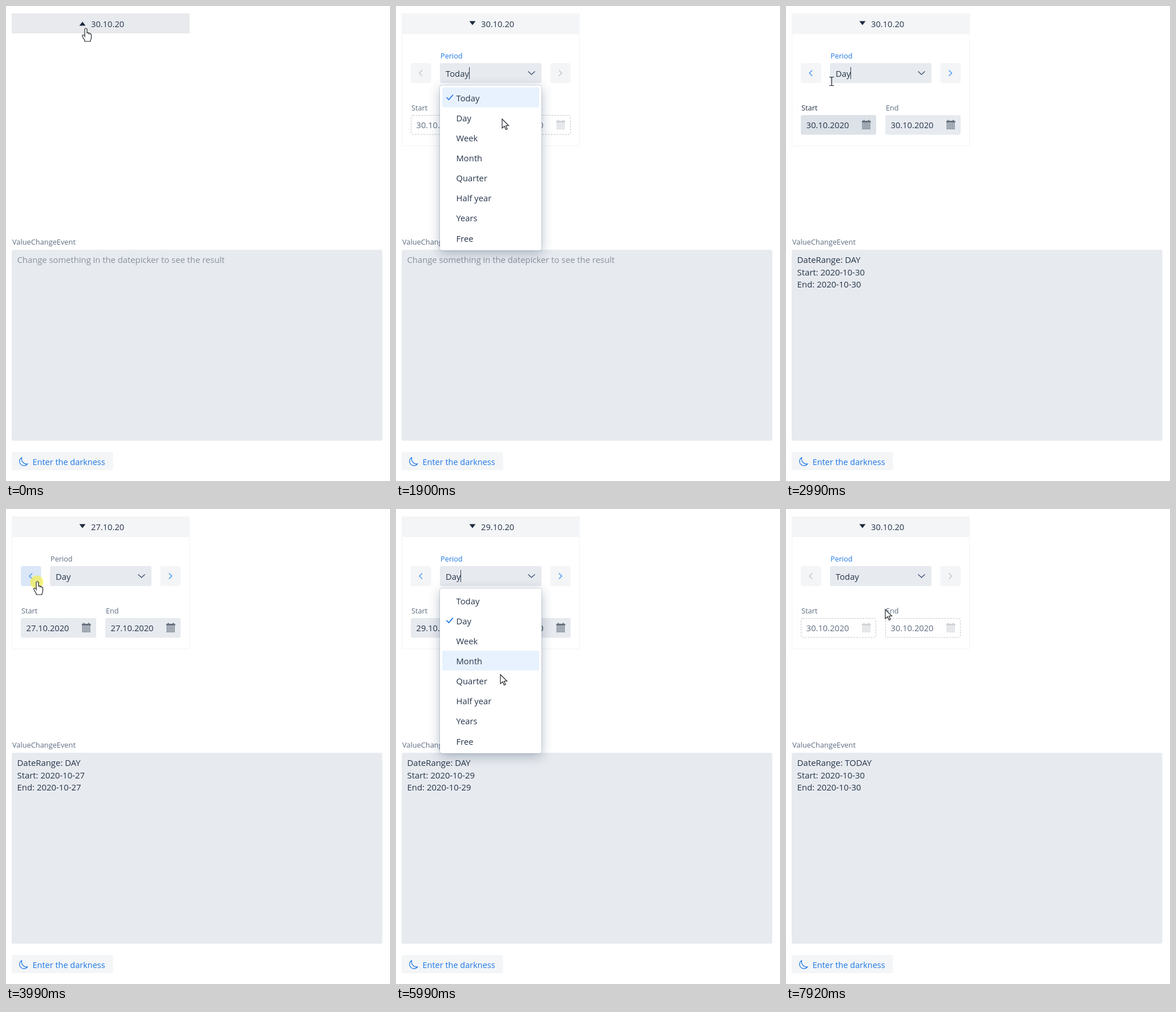
Animation, 673 px wide and 832 px high, one loop 8 s. Source, as an HTML page with a canvas:

```html
<!DOCTYPE html>
<html lang="en">
<head>
<meta charset="utf-8">
<title>Date range picker</title>
<style>
html, body { margin: 0; width: 100%; height: 100%; overflow: hidden; background: #fff; }
canvas { display: block; }
</style>
</head>
<body>
<canvas id="stage" width="673" height="832"></canvas>
<script>
const ctx = document.getElementById('stage').getContext('2d');
const LOOP = 8000;
const INK = '#26354a', MUTED = '#5e6d80', BLUE = '#1f78e6', FIELD = '#e7eaef', PALE = '#f4f5f7';
const ITEMS = ['Today', 'Day', 'Week', 'Month', 'Quarter', 'Half year', 'Years', 'Free'];
const CLICKS = [490, 1600, 2730, 3600, 3750, 3900, 4640, 4890, 5620, 7530];

// pointer path: time, x, y
const PATH = [
  [80, 140, 39], [400, 138, 31], [910, 138, 31], [1450, 190, 118], [1750, 188, 118],
  [1900, 186, 198], [2100, 160, 203], [2430, 150, 200], [2790, 150, 200], [2920, 110, 194],
  [2990, 80, 132], [3200, 55, 127], [4050, 55, 127], [4550, 290, 122], [5240, 290, 122],
  [5460, 187, 117], [5750, 186, 117], [5990, 183, 290], [6130, 183, 290], [6450, 180, 199],
  [7150, 180, 199], [7380, 178, 166], [7600, 178, 166], [7920, 174, 176]
];
const POINTERS = {
  hand: new Path2D('M-2 13V2A2 2 0 0 1 2 2V9Q2 7.5 3.3 7.5T4.6 9Q5 8 6.2 8.4T7.3 10Q9.5 9.5 9.5 12V16Q9.5 19 8 21V23H-2V21L-6 14.5Q-7 11.5 -5 11.5T-2 14Z'),
  arrow: new Path2D('M0 0V16L4 12.5L6.5 18.5L9 17.5L6.5 11.5H11.5Z'),
  beam: new Path2D('M-4 -7.5H-1L0 -6.5L1 -7.5H4M0 -6.5V6.5M-4 7.5H-1L0 6.5L1 7.5H4')
};
const HEADER = [10, 13, 312, 35], SELECT = [77, 100, 178, 35];
const PREV = [26, 100, 35.5, 35], NEXT = [270.5, 100, 35.5, 35];
const START = [26, 191, 132, 34.5], END = [174, 191, 132, 34.5];

const between = (t, a, b) => t >= a && t < b;
const inside = ([px, py], [x, y, w, h]) => px >= x && px < x + w && py >= y && py < y + h;

function pointerAt(t) {
  const i = PATH.findIndex(p => p[0] > t);
  if (i === 0) return PATH[0].slice(1);
  if (i < 0) return PATH[PATH.length - 1].slice(1);
  const [t0, x0, y0] = PATH[i - 1], [t1, x1, y1] = PATH[i];
  const u = (t - t0) / (t1 - t0), s = u * u * (3 - 2 * u);
  return [x0 + (x1 - x0) * s, y0 + (y1 - y0) * s];
}

const panelOpen = t => t >= 560;
const listOpen = t => between(t, 1750, 2800) || between(t, 5750, 7620);

// hover fades in and out over 200 ms
function hover(t, box) {
  let sum = 0;
  for (let k = 0; k < 5; k++) {
    const s = t - 40 * k;
    if (!listOpen(s) && inside(pointerAt(s), box)) sum++;
  }
  return sum / 5;
}

function text(str, x, y, color, size = 14.8) {
  ctx.font = size + 'px "Open Sans", "Noto Sans", sans-serif';
  ctx.fillStyle = color;
  ctx.fillText(str, x, y);
}

function box([x, y, w, h], color, r = 3) {
  ctx.fillStyle = color;
  ctx.beginPath();
  ctx.roundRect(x, y, w, h, r);
  ctx.fill();
}

function line(points, color, width) {
  ctx.strokeStyle = color;
  ctx.lineWidth = width;
  ctx.beginPath();
  points.forEach(([x, y]) => ctx.lineTo(x, y));
  ctx.stroke();
}

const shade = a => `rgba(20,45,80,${a})`;

function drawHeader(t, date) {
  box(HEADER, PALE, 0);
  box(HEADER, shade(0.055 * hover(t, HEADER)), 0);
  const [base, tip] = panelOpen(t) ? [26.5, 33.5] : [34.5, 27.5];
  ctx.fillStyle = '#1c2a3e';
  ctx.beginPath();
  ctx.moveTo(128.5, base);
  ctx.lineTo(139.5, base);
  ctx.lineTo(134, tip);
  ctx.fill();
  text(date, 149, 37, INK, 14.7);
}

function drawStep(t, area, dir, enabled) {
  box(area, PALE);
  if (enabled) box(area, `rgba(22,118,243,${0.11 * hover(t, area)})`);
  const x = area[0] + 17.5 + dir * 2.5;
  line([[x - dir * 5, 112.5], [x, 117.5], [x - dir * 5, 122.5]], enabled ? '#4f9ff5' : '#c3c8cf', 1.6);
}

function drawCalendar(x, color) {
  ctx.fillStyle = color;
  ctx.fillRect(x, 201, 15.5, 3.5);
  ctx.fillRect(x + 2.5, 199.5, 2, 2);
  ctx.fillRect(x + 11, 199.5, 2, 2);
  for (let r = 0; r < 4; r++)
    for (let c = 0; c < 5; c++) ctx.fillRect(x + 0.5 + c * 3, 205.5 + r * 2.8, 2.2, 2);
}

function drawDate(t, area, label, date, enabled) {
  const over = enabled ? hover(t, area) : 0;
  const x = area[0];
  text(label, x + 1, 182.5, over > 0.5 ? INK : MUTED, 12.7);
  if (enabled) {
    box(area, FIELD);
    box(area, shade(0.07 * over));
  } else {
    ctx.setLineDash([3, 2]);
    ctx.strokeStyle = '#c0c5cc';
    ctx.lineWidth = 1;
    ctx.beginPath();
    ctx.roundRect(x + 0.5, 191.5, 131, 33.5, 3);
    ctx.stroke();
    ctx.setLineDash([]);
  }
  text(date, x + 9.5, 214, enabled ? INK : MUTED, 14.7);
  drawCalendar(x + 107, enabled ? '#66717f' : '#cfd2d6');
}

function drawSelect(t, value) {
  const focus = between(t, 1600, 3530) || t >= 5620;
  const over = focus ? 0 : hover(t, SELECT);
  text('Period', 78, 91.5, focus ? BLUE : over > 0.5 ? INK : MUTED, 12.7);
  box(SELECT, FIELD);
  box(SELECT, shade(0.06 * over));
  text(value, 87, 124, INK);
  const since = t - (t < 4000 ? 1600 : 5620);
  if (focus && t < 7530 && since % 1000 < 500) {
    const x = Math.round(87 + ctx.measureText(value).width);
    ctx.fillRect(x, 107, 1, 21);
  }
  line([[231.5, 114.5], [237.5, 120], [243.5, 114.5]], '#4a5c78', 1.6);
}

function drawList(t, value) {
  ctx.save();
  ctx.shadowColor = shade(0.3);
  ctx.shadowBlur = 20;
  ctx.shadowOffsetY = 5;
  box([77, 139, 178, 289], '#fff', 4);
  ctx.restore();
  ctx.strokeStyle = shade(0.16);
  ctx.lineWidth = 1;
  ctx.beginPath();
  ctx.roundRect(76.5, 138.5, 179, 290, 4);
  ctx.stroke();
  const row = Math.max(0, Math.floor((pointerAt(t - 70)[1] - 142.5) / 35.15));
  ITEMS.forEach((item, i) => {
    const y = 142.5 + i * 35.15;
    if (i === row) box([81, y, 170, 35], '#e8f2fe');
    if (item === value) line([[88.5, y + 17.5], [92.5, y + 21.5], [100, y + 13]], BLUE, 1.7);
    text(item, 105.5, Math.round(y + 24), INK);
  });
}

function drawResult(lines) {
  text('ValueChangeEvent', 11, 418, MUTED, 12.8);
  box([10, 427, 649.5, 334.5], FIELD);
  if (lines) lines.forEach((s, i) => text(s, 19.5, 450 + i * 21.5, INK, 14.9));
  else text('Change something in the datepicker to see the result', 19.5, 450, '#8a929e');
}

function drawButton() {
  box([10, 781, 177.5, 32], '#f3f5f7');
  ctx.strokeStyle = BLUE;
  ctx.lineWidth = 1.3;
  ctx.stroke(new Path2D('M27.5 791A7.6 7.6 0 1 0 37.5 802A9 9 0 0 1 27.5 791Z'));
  text('Enter the darkness', 46.5, 803.5, BLUE, 14.5);
}

function drawPointer(t) {
  const p = pointerAt(t);
  const fields = [SELECT, START, END];
  let kind = 'arrow';
  if (inside(p, HEADER)) kind = 'hand';
  else if (!listOpen(t)) {
    if (inside(p, PREV) || inside(p, NEXT)) kind = 'hand';
    else if (fields.some(f => inside(p, f))) kind = 'beam';
  }
  const click = CLICKS.find(c => between(t, c, c + 140));
  if (click !== undefined) {
    ctx.fillStyle = `rgba(245,240,60,${0.65 * Math.min(1, (click + 140 - t) / 50)})`;
    ctx.beginPath();
    ctx.arc(p[0] - 1, p[1] + 1, 11.5, 0, 7);
    ctx.fill();
  }
  ctx.save();
  ctx.translate(...p);
  ctx.fillStyle = '#fff';
  ctx.strokeStyle = '#20242a';
  ctx.lineWidth = 1.2;
  if (kind !== 'beam') ctx.fill(POINTERS[kind]);
  ctx.stroke(POINTERS[kind]);
  ctx.restore();
}

function draw(t) {
  ctx.fillStyle = '#fff';
  ctx.fillRect(0, 0, 673, 832);

  const passed = times => times.filter(c => t >= c).length;
  const today = t < 2800 || t >= 7620;
  const day = today ? 30 : 30 - passed([3660, 3810, 3960]) + passed([4700, 4950]);
  const value = today ? 'Today' : 'Day';
  const full = day + '.10.2020', iso = '2020-10-' + day;

  drawHeader(t, day + '.10.20');
  drawResult(t >= 2800 && ['DateRange: ' + value.toUpperCase(), 'Start: ' + iso, 'End: ' + iso]);
  drawButton();
  if (panelOpen(t)) {
    ctx.strokeStyle = '#f2f3f5';
    ctx.lineWidth = 1;
    ctx.strokeRect(10.5, 48.5, 311, 196.5);
    drawStep(t, PREV, -1, !today);
    drawStep(t, NEXT, 1, !today);
    drawSelect(t, value);
    drawDate(t, START, 'Start', full, !today);
    drawDate(t, END, 'End', full, !today);
    if (listOpen(t)) drawList(t, value);
  }
  drawPointer(t);
}

function tick() {
  draw(performance.now() % LOOP);
  requestAnimationFrame(tick);
}
tick();
</script>
</body>
</html>
```
